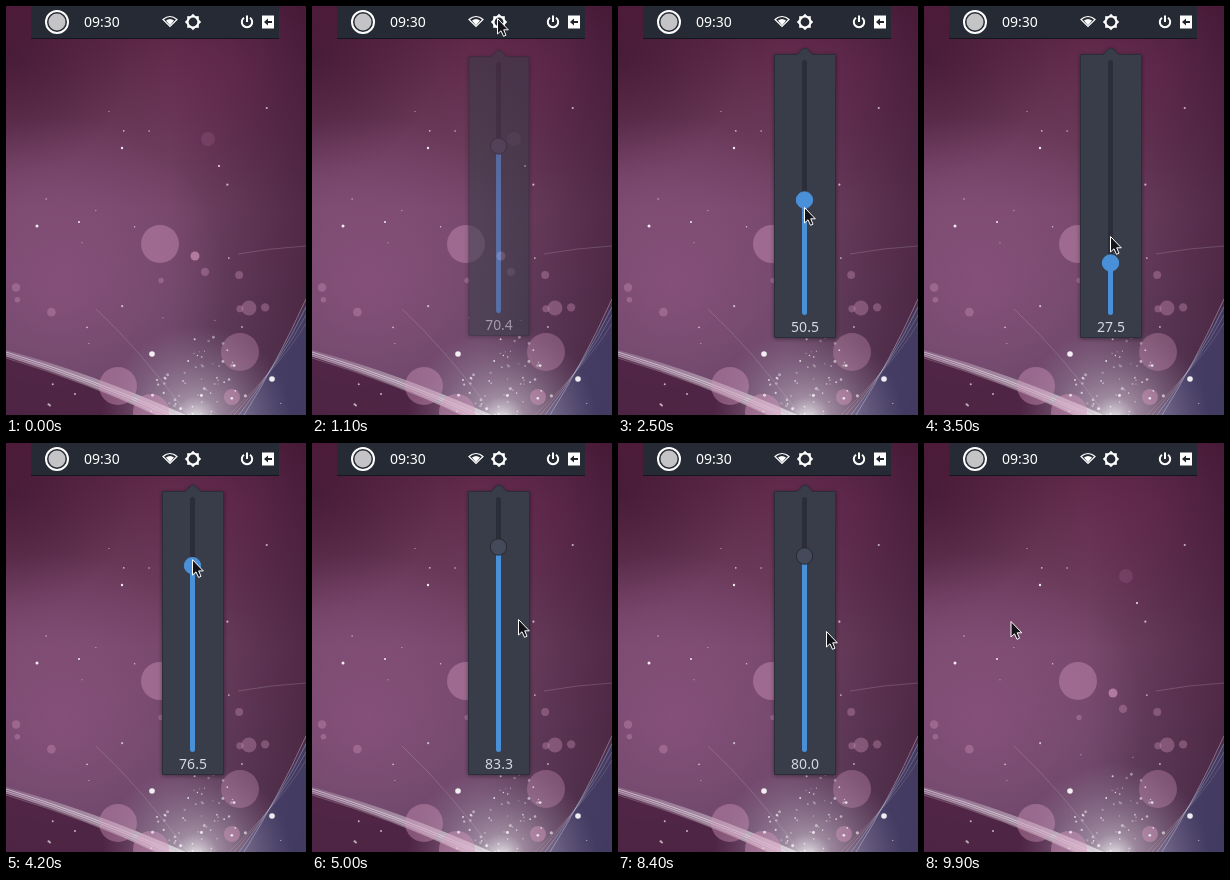
Write an HTML page that moves like this. It is 300 px wide and 409 px high and loops after 10000 ms.

```html
<!DOCTYPE html>
<html lang="en">
<head>
<meta charset="utf-8">
<title>Brightness slider</title>
<style>
  html, body { margin: 0; width: 100%; height: 100%; overflow: hidden; background: #4a2140; }
  svg { display: block; width: 300px; height: 409px; }
  text { font: 14px "Noto Sans", "Open Sans", sans-serif; }
</style>
</head>
<body>
<svg viewBox="0 0 300 409" xmlns="http://www.w3.org/2000/svg">
  <defs>
    <linearGradient id="sky" x2="0" y2="1">
      <stop offset="0" stop-color="#55203f"/>
      <stop offset=".2" stop-color="#62304f"/>
      <stop offset=".5" stop-color="#744566"/>
      <stop offset="1" stop-color="#5e4460"/>
    </linearGradient>
    <linearGradient id="edge" x2="1" y2="0">
      <stop offset=".55" stop-color="#35122d" stop-opacity="0"/>
      <stop offset=".86" stop-color="#35122d" stop-opacity=".38"/>
      <stop offset="1" stop-color="#35122d" stop-opacity=".55"/>
    </linearGradient>
    <radialGradient id="corner" gradientUnits="userSpaceOnUse" cx="0" cy="50" r="125">
      <stop offset="0" stop-color="#3d1430" stop-opacity=".65"/>
      <stop offset="1" stop-color="#3d1430" stop-opacity="0"/>
    </radialGradient>
    <radialGradient id="rose" gradientUnits="userSpaceOnUse" cx="240" cy="65" r="120">
      <stop offset="0" stop-color="#7a3460" stop-opacity=".5"/>
      <stop offset="1" stop-color="#7a3460" stop-opacity="0"/>
    </radialGradient>
    <radialGradient id="haze" gradientUnits="userSpaceOnUse" cx="55" cy="275" r="165">
      <stop offset="0" stop-color="#89527f" stop-opacity=".85"/>
      <stop offset=".5" stop-color="#89527f" stop-opacity=".5"/>
      <stop offset="1" stop-color="#89527f" stop-opacity="0"/>
    </radialGradient>
    <radialGradient id="glow" gradientUnits="userSpaceOnUse" cx="190" cy="414" r="95">
      <stop offset="0" stop-color="#fff" stop-opacity=".9"/>
      <stop offset=".25" stop-color="#d3c6d6" stop-opacity=".55"/>
      <stop offset="1" stop-color="#a58cab" stop-opacity="0"/>
    </radialGradient>
    <linearGradient id="beam">
      <stop offset="0" stop-color="#fff" stop-opacity=".15"/>
      <stop offset="1" stop-color="#fff" stop-opacity=".6"/>
    </linearGradient>
    <filter id="shadow" x="-20%" y="-5%" width="140%" height="110%">
      <feDropShadow dx="0" dy="1" stdDeviation="2" flood-color="#000" flood-opacity=".4"/>
    </filter>
  </defs>

  <rect width="300" height="409" fill="url(#sky)"/>
  <rect width="300" height="409" fill="url(#rose)"/>
  <rect width="300" height="409" fill="url(#corner)"/>
  <rect width="300" height="409" fill="url(#edge)"/>
  <rect width="300" height="409" fill="url(#haze)"/>
  <path d="M300 297Q270 360 232 409H300Z" fill="#3f4471" opacity=".65"/>
  <path d="M0 350Q85 375 160 409H0Z" fill="#4b1f3f" opacity=".85"/>
  <rect width="300" height="409" fill="url(#glow)"/>
  <path d="M0 344Q85 367 180 409H150Q85 378 0 351Z" fill="url(#beam)"/>
  <path d="M232 248Q265 242 300 240M90 303Q135 345 182 409" fill="none" stroke="#e9dcea" opacity=".18"/>
  <g id="rays" fill="none" stroke="#f0e6f2"/>
  <g id="bubbles" fill="#d498bd"/>
  <g id="sparks" fill="#fff"/>

  <rect x="25" width="248" height="33" fill="#262a34"/>
  <rect x="25" y="32" width="248" height="1" fill="#14161c"/>
  <circle cx="51" cy="16" r="11" fill="none" stroke="#fff" stroke-width="2"/>
  <circle cx="51" cy="16" r="8.5" fill="#c4c4c6"/>
  <text x="78" y="21" fill="#fff">09:30</text>
  <path d="M157 13.5Q164 7.5 171 13.5L164 20.5Z" fill="none" stroke="#fff" stroke-width="1.2"/>
  <path d="M160 14.5Q164 11.5 168 14.5L164 19.5Z" fill="#fff"/>
  <g transform="translate(187 16)" fill="#fff">
    <path id="square" d="M-5.8-5.8H5.8V5.8H-5.8Z"/>
    <use href="#square" transform="rotate(45)"/>
    <circle r="4.4" fill="#262a34"/>
  </g>
  <path d="M238 11.8A5.2 5.2 0 1 0 244 11.8M241 9.5V16" fill="none" stroke="#fff" stroke-width="2"/>
  <path d="M256 9.5H268V22.5H256Z" fill="#fff"/>
  <path d="M258 16L262 12.5V15H266V17H262V19.5Z" fill="#20242d"/>

  <g id="popup">
    <path d="M156.5 48.5H179.5L184.5 43Q187 41 189.5 43L194.5 48.5H217.5V331.5H156.5Z"
          fill="#383c4a" stroke="#2a2d38" filter="url(#shadow)"/>
    <rect x="184" y="54" width="5" height="255" rx="2.5" fill="#2b2e39"/>
    <rect id="level" x="184" width="5" rx="2.5" fill="#4a90d9"/>
    <circle id="knob" cx="186.5" r="8.2"/>
    <text id="label" x="187" y="326" text-anchor="middle" fill="#d3dae3"></text>
  </g>
  <path id="cursor" d="M.5 .5V16L4 12.8L6.5 18.3L9 17.2L6.7 11.8H11.3Z"
        fill="#15131a" stroke="#fff" stroke-linejoin="round"/>
</svg>
<script>
const LOOP = 10000, STEP = 100;
const $ = id => document.getElementById(id);

function set(el, attributes) {
  for (const [name, value] of Object.entries(attributes)) el.setAttribute(name, value);
}

function add(parent, tag, attributes) {
  const el = document.createElementNS("http://www.w3.org/2000/svg", tag);
  set(el, attributes);
  $(parent).append(el);
}

let seed = 17;
const random = (low = 0, high = 1) =>
  low + (high - low) * (seed = seed * 16807 % 2147483647) / 2147483647;

function drawWallpaper() {
  for (let i = 0; i < 4; i++) {
    const opacity = .6 - i * .12;
    add("rays", "path", { d: `M0 ${346 + i * 2}Q85 ${372 + i * 2} ${168 - i * 6} 409`, opacity });
    add("rays", "path", { d: `M300 ${293 + i * 8}Q${272 + i * 2} 355 ${238 - i * 5} 409`, opacity: opacity * .6 });
  }

  const bubble = (cx, cy, r, opacity) => add("bubbles", "circle", { cx, cy, r, opacity });
  bubble(154, 238, 19, .4);
  bubble(234, 346, 19, .33);
  bubble(112, 380, 19, .4);
  bubble(145, 406, 18, .45);
  bubble(243, 302, 7.5, .35);
  bubble(226, 391, 8, .45);
  bubble(202, 133, 7, .14);
  bubble(189, 250, 4.5, .65);
  for (let i = 0; i < 8; i++) bubble(random(10, 290), random(265, 335), random(2.5, 4.5), .35);

  const spark = (cx, cy, r, opacity = .9) => add("sparks", "circle", { cx, cy, r, opacity });
  spark(146, 348, 2.8);
  spark(266, 373, 2.8);
  spark(116, 142, 1.2);
  spark(213, 160, 1);
  spark(73, 216, 1);
  spark(31, 220, 1.5);
  for (let i = 0; i < 22; i++) spark(random(10, 290), 400 - 300 * random() ** 2, random(.5, 1.2), .65);
  for (let i = 0; i < 60; i++) {
    spark(194 + 50 * (random() + random() - 1), 409 - 78 * random() ** 1.6, random(.5, 1.6), random(.25, .8));
  }
}

const clamp = (v, low, high) => Math.min(high, Math.max(low, v));
const ramp = (t, start, end) => clamp((t - start) / (end - start), 0, 1);
const ease = p => p * p * (3 - 2 * p);

const DRAG_START = 1900, DRAG_END = 4500, GRIP = 7;
const TRACK_ZERO = 332.6, UNIT = 2.745;

// Each move: start, end, x, y.
const moves = [
  [100, 900, 185, 12],
  [1400, 1900, 186, 146.3],
  [1900, 2400, 186, 201],
  [2500, 3200, 186, 264],
  [3400, 3500, 186, 230],
  [3500, 4300, 186, 111],
  [4500, 5000, 206, 176],
  [5000, 5600, 208, 188],
  [8800, 9500, 86.5, 178]
];

function pointerAt(t) {
  return moves.reduce(([x, y], [start, end, toX, toY]) => {
    const p = ease(ramp(t, start, end));
    return [x + (toX - x) * p, y + (toY - y) * p];
  }, [299, 250]);
}

function valueAt(t) {
  // The knob trails the pointer by one step; scrolling takes over after the drag.
  const dragY = pointerAt(clamp(t - STEP, DRAG_START, DRAG_END))[1] - GRIP;
  const scrolled = 2.6 * ramp(t, 7800, 8400) - 5.9 * ease(ramp(t, 5000, 7400));
  return (TRACK_ZERO - dragY) / UNIT + scrolled;
}

function render(t) {
  const [x, y] = pointerAt(t);
  const value = valueAt(t);
  const knobY = TRACK_ZERO - UNIT * value;
  const fade = Math.min(ramp(t, 900, 1250), 1 - ramp(t, 9600, 9900));
  const scale = .965 + .035 * fade;
  const active = t >= DRAG_START - STEP && t <= DRAG_END;

  set($("cursor"), { transform: `translate(${x} ${y})`, visibility: t < STEP ? "hidden" : "visible" });
  set($("popup"), { opacity: fade, transform: `translate(187 190) scale(${scale}) translate(-187 -190)` });
  set($("level"), { y: knobY, height: 309 - knobY });
  set($("knob"), { cy: knobY, fill: active ? "#4a90d9" : "#444a5a", stroke: active ? "#4a90d9" : "#262933" });
  $("label").textContent = value.toFixed(1);
}

function tick() {
  render(Math.floor(performance.now() % LOOP / STEP) * STEP);
  requestAnimationFrame(tick);
}

drawWallpaper();
tick();
</script>
</body>
</html>
```
